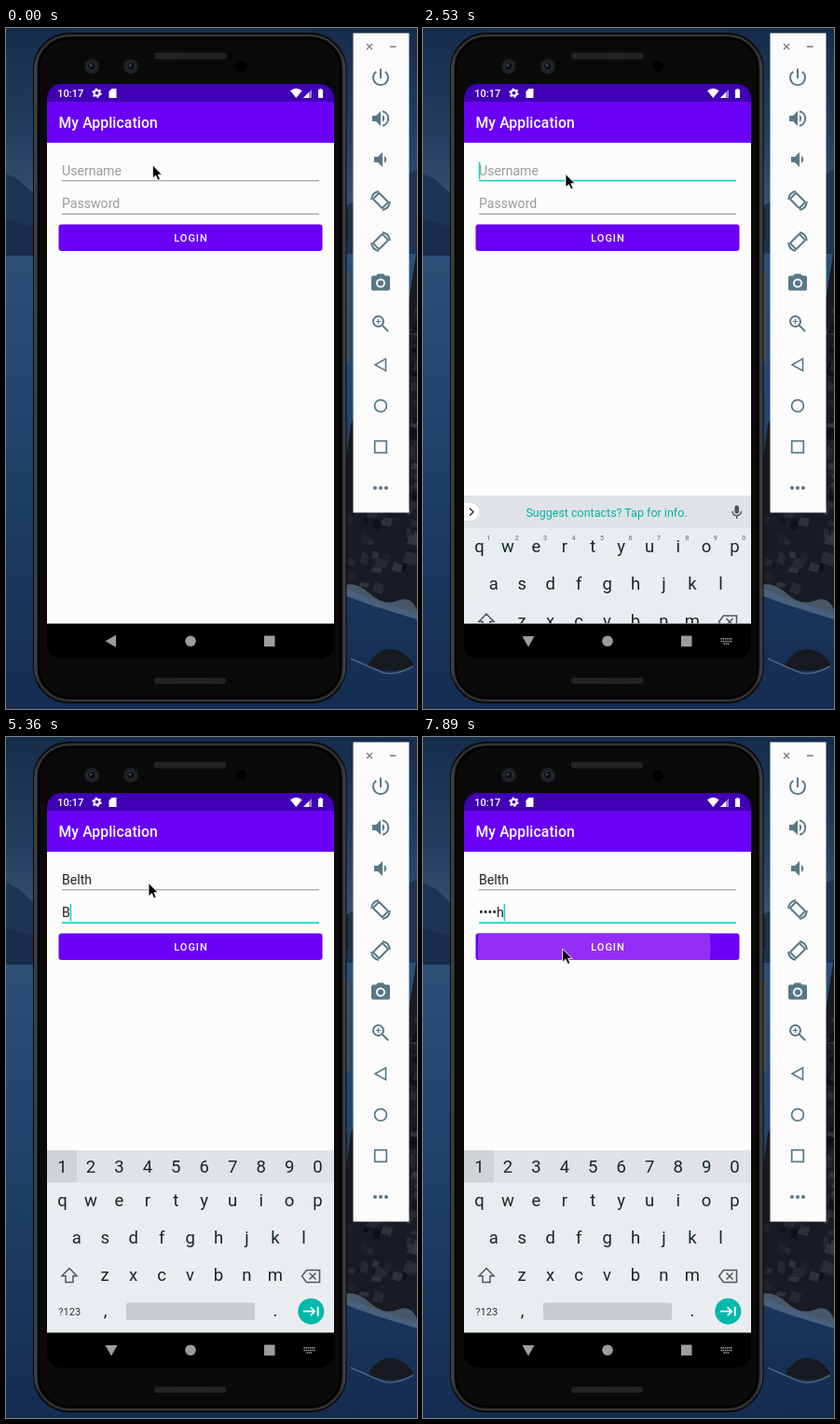
Animation of 441 by 730 pixels, one loop 8 s. Source, as an HTML page:

```html
<!DOCTYPE html>
<html lang="en">
<head>
<meta charset="utf-8">
<title>Login demo</title>
<style>
html, body { margin: 0; width: 100%; height: 100%; overflow: hidden; background: #14294a; }
svg { display: block; width: 441px; height: 730px; font-family: Roboto, sans-serif; }
.mid { text-anchor: middle; }
.line { fill: none; stroke-width: 2; }
</style>
</head>
<body>
<svg id="stage" viewBox="0 0 441 730" xmlns="http://www.w3.org/2000/svg">
  <defs>
    <linearGradient id="sky" x2="0" y2="1">
      <stop offset="0" stop-color="#162c4b"/>
      <stop offset=".5" stop-color="#243f61"/>
      <stop offset="1" stop-color="#46607f"/>
    </linearGradient>
    <linearGradient id="sea" x2="0" y2="1">
      <stop offset="0" stop-color="#2c5078"/>
      <stop offset=".3" stop-color="#234670"/>
      <stop offset="1" stop-color="#142c50"/>
    </linearGradient>
    <linearGradient id="rim">
      <stop offset="0" stop-color="#4b4b4c"/>
      <stop offset=".02" stop-color="#161616"/>
      <stop offset=".98" stop-color="#161616"/>
      <stop offset="1" stop-color="#4b4b4c"/>
    </linearGradient>
    <pattern id="mesh" width="3" height="3" patternUnits="userSpaceOnUse">
      <rect width="3" height="3" fill="#2b2b2b"/><path d="M0 0L3 3M3 0L0 3" stroke="#171717" stroke-width=".7"/>
    </pattern>
    <clipPath id="screen"><rect x="44" y="60" width="308" height="616" rx="15"/></clipPath>
    <clipPath id="app"><rect x="44" y="123" width="308" height="515"/></clipPath>
    <clipPath id="button"><rect x="56.5" y="210.5" width="283" height="28.5" rx="3"/></clipPath>
  </defs>

  <!-- wallpaper -->
  <rect width="441" height="245" fill="url(#sky)"/>
  <rect y="240" width="441" height="490" fill="url(#sea)"/>
  <path d="M0 156L14 163 32 180V240H0ZM441 152L365 190V242H441Z" fill="#1d3453"/>
  <path d="M0 205L32 214V244H0Z" fill="#182d4b"/>
  <path d="M441 236L431 300 392 380 370 425 360 500 358 598 392 612 441 628Z" fill="#181b22"/>
  <g id="rocks"></g>
  <path d="M358 598Q375 592 390 606T420 614 441 624V634Q415 626 396 620T358 606Z" fill="#637890" opacity=".65"/>
  <path d="M388 684Q398 664 416 666 432 670 438 684 414 694 388 684Z" fill="#171a20"/>
  <path d="M370 676Q388 684 402 690T437 684" fill="none" stroke="#71839a" stroke-width="1.5" opacity=".6"/>

  <!-- phone -->
  <rect x="364" y="194" width="3.5" height="34" rx="1" fill="#252525"/>
  <rect x="364" y="261" width="4" height="97" rx="1" fill="#4d4d4f"/>
  <rect x="29.5" y="5.5" width="335.5" height="718" rx="38" fill="url(#rim)" stroke="#050505"/>
  <rect x="32" y="8" width="330.5" height="713" rx="36" fill="none" stroke="#3f3f40" stroke-width="1.3"/>
  <rect x="35" y="11" width="324.5" height="707" rx="33" fill="#0a0a0a" stroke="#000" stroke-width="2"/>
  <rect x="159" y="26.5" width="77" height="7" rx="3" fill="url(#mesh)"/>
  <rect x="159" y="696.5" width="77" height="6.5" rx="3" fill="url(#mesh)"/>
  <g id="lenses"></g>
  <circle cx="252" cy="41" r="6" fill="#000"/>

  <g clip-path="url(#screen)">
    <rect x="44" y="60" width="308" height="616" fill="#000"/>
    <rect x="44" y="60" width="308" height="19.5" fill="#4000b4"/>
    <rect x="44" y="79" width="308" height="44" fill="#6a00f5"/>
    <rect x="44" y="123" width="308" height="515.5" fill="#fcfcfc"/>
    <g fill="#fff">
      <text x="55.3" y="73.7" font-size="11" font-weight="500">10:17</text>
      <g fill="none" stroke="#fff">
        <circle cx="97.5" cy="69.7" r="2.9" stroke-width="2"/>
        <circle cx="97.5" cy="69.7" r="4.5" stroke-width="1.5" stroke-dasharray="2.1 2.61"/>
      </g>
      <path d="M113.5 65H118.5V75H110.5V68Z"/>
      <path d="M305 67.3Q311.3 62.3 317.6 67.3L311.3 75Z"/>
      <path d="M319 75L328 66V75Z" opacity=".5"/><path d="M319 75L325 69V75Z"/>
      <path d="M335 66H336.5V65H338.5V66H340V75H335Z"/>
      <text x="56.5" y="107" font-size="15.7" font-weight="500" letter-spacing=".12">My Application</text>
    </g>

    <g font-size="14.1">
      <text id="user" x="60" y="158"></text>
      <text id="pass" x="60" y="193.2"></text>
    </g>
    <rect id="userLine" x="60" width="276"/>
    <rect id="passLine" x="60" width="276"/>
    <rect id="compose" x="60" y="158.8" height="1" fill="#333"/>
    <rect id="caret" width="1.6" height="18.5" fill="#1fd1c0"/>
    <g clip-path="url(#button)">
      <rect x="56" y="210" width="284" height="30" fill="#6a00f5"/>
      <path id="ripple" d="M59.5 210Q58 225 59.5 240H307.5Q309.5 225 307.5 210Z" fill="#942ef7"/>
    </g>
    <text class="mid" x="198.5" y="229" font-size="11" font-weight="500" letter-spacing=".98" fill="#fff">LOGIN</text>

    <g clip-path="url(#app)"><g id="keyboard">
      <rect x="44" y="443" width="308" height="196" fill="#e9edf0"/>
      <rect x="44" y="443" width="308" height="34.5" fill="#dfe3e6"/>
      <g id="strip">
        <path d="M44 450.5H50.5A9.5 9.5 0 0 1 50.5 469.5H44Z" fill="#fff"/>
        <path d="M50 456.3L54 460.3 50 464.3" fill="none" stroke="#333" stroke-width="1.5"/>
        <text id="notice" class="mid" x="197" y="465" font-size="12.5" fill="#00b3a1">Suggest contacts? Tap for info.</text>
        <g id="words" font-size="14.2" fill="#56646c"></g>
        <g fill="#4b565c">
          <rect x="334.4" y="453.2" width="4.6" height="9" rx="2.3"/>
          <path d="M332 459.5Q332 464.2 336.7 464.2T341.4 459.5M336.7 464V467.5" fill="none" stroke="#4b565c" stroke-width="1.4"/>
        </g>
      </g>
      <g id="digits" font-size="18.5" fill="#16262d">
        <rect id="pressed" x="44" y="443" width="32" height="34.5" fill="#d0d4d6"/>
      </g>
      <g id="hints" font-size="7.2" fill="#59666d"></g>
      <g id="letters" font-size="18.5" fill="#16262d"></g>
      <g fill="none" stroke="#4b585f" stroke-width="1.5">
        <path d="M68 569.5L76 577.8H72V584.5H64V577.8H60Z"/>
        <path d="M322.5 571.5H336.5V584.5H322.5L317.5 578Z"/>
        <path d="M325.5 574.5L332.5 581.5M332.5 574.5L325.5 581.5"/>
      </g>
      <text class="mid" x="68.2" y="620" font-size="11" fill="#2a383f">?123</text>
      <rect id="space" y="606.5" height="18.5" rx="2" fill="#c8ccd0"/>
      <g id="smile" fill="none" stroke="#4b585f" stroke-width="1.4">
        <circle cx="136.8" cy="615.7" r="7.3"/>
        <path d="M132.8 617.5Q136.8 622.8 140.8 617.5Z" fill="#4b585f" stroke="none"/>
        <path d="M133.2 613.3H135.4M138.2 613.3H140.4" stroke-width="2"/>
      </g>
      <circle cx="327.3" cy="615.7" r="14" fill="#02b8aa"/>
      <path d="M319 615.7H331M326.7 611.2L331.2 615.7 326.7 620.2M334.7 610.7V620.7" fill="none" stroke="#fff" stroke-width="1.8"/>
    </g></g>

    <g fill="#9d9d9d">
      <path id="back"/>
      <circle cx="198" cy="657.2" r="5.8"/>
      <rect x="277" y="651.5" width="11.5" height="11.5" rx=".5"/>
      <path id="kbIcon" d="M319.5 654.7H331.5M319.5 657.4H331.5M322.5 660.1H328.5" stroke="#9d9d9d" stroke-width="1.5" stroke-dasharray="1.5 .6"/>
    </g>
  </g>

  <!-- emulator toolbar -->
  <rect x="372.5" y="5.5" width="60" height="514" fill="#fbfbfb"/>
  <path d="M387 17L393 23M393 17L387 23M412 20H418.5" stroke="#75797c" stroke-width="1.3"/>
  <g id="tools" fill="#587887" stroke="#587887"></g>

  <path id="pointer" d="M0 0V14.4L3.4 11.3 5.7 16.5 8.2 15.4 5.9 10.4H10.2Z" fill="#000" stroke="#fff" stroke-width=".9"/>
</svg>
<script>
const NS = 'http://www.w3.org/2000/svg';
const $ = id => document.getElementById(id);
function add(parent, tag, attrs, text) {
  const el = document.createElementNS(NS, tag);
  for (const k in attrs) el.setAttribute(k, attrs[k]);
  if (text) el.textContent = text;
  $(parent).appendChild(el);
  return el;
}
const set = (id, attrs) => { for (const k in attrs) $(id).setAttribute(k, attrs[k]); };
const show = (id, on) => $(id).style.display = on ? '' : 'none';

// rock facets
let seed = 7;
const rnd = () => (seed = seed * 16807 % 2147483647) / 2147483647;
for (let i = 0; i < 60; i++) {
  const y = 300 + rnd() * 295;
  const x = y < 510 ? 434 + rnd() * 6 : 364 + rnd() * 76;
  const w = 4 + rnd() * 9, h = 3 + rnd() * 9;
  add('rocks', 'path', {
    d: `M${x} ${y}l${w} ${h * .4}l${-w * .3} ${h}l${-w} ${-h * .3}z`,
    fill: ['#2a2d34', '#0d1016', '#353840', '#20242c'][i % 4], opacity: .8
  });
}

for (const x of [92, 134]) {
  add('lenses', 'circle', { cx: x, cy: 41, r: 8, fill: '#1d1f22' });
  add('lenses', 'circle', { cx: x, cy: 41, r: 4.5, fill: '#0c1017', stroke: '#30363e' });
  add('lenses', 'circle', { cx: x - 1, cy: 40, r: 1.5, fill: '#3c4653' });
}

// toolbar icons, each centred on its own origin
const ring = 'class="line" d=';
const turn = `<rect class="line" x="-4.6" y="-7" width="9.2" height="14" rx="1" transform="rotate(-45)"/>
  <path ${ring}"M-9.8 -1Q-9.5 -8.5 -2 -10M9.8 1Q9.5 8.5 2 10" stroke-width="1.6"/>`;
const speaker = '<path d="M-9 -3H-5L0 -8V8L-5 3H-9Z" stroke="none"/><path d="M2 -4Q6.5 0 2 4Z" stroke="none"/>';
const icons = [
  `<path ${ring}"M-4.8 -6.2A8 8 0 1 0 4.8 -6.2M0 -9.5V1"/>`,
  speaker + `<path ${ring}"M2 -7.8A8 8 0 0 1 2 7.8"/>`,
  `<g transform="translate(2)">${speaker}</g>`,
  turn,
  `<g transform="scale(-1 1)">${turn}</g>`,
  `<path fill-rule="evenodd" stroke="none" d="M-3 -9.5H3L4.8 -7.5H8Q10 -7.5 10 -5.5V6.5Q10 8.5 8 8.5H-8Q-10 8.5 -10 6.5V-5.5Q-10 -7.5 -8 -7.5H-4.8ZM0 -4.5A5 5 0 1 0 .01 -4.5Z"/><circle cy=".5" r="3.1" stroke="none"/>`,
  `<circle class="line" cx="-2.5" cy="-2.5" r="5.5"/><path ${ring}"M1.7 1.7L8.2 8.2"/><path ${ring}"M-5.2 -2.5H.2M-2.5 -5.2V.2" style="stroke-width:1.2"/>`,
  `<path ${ring}"M5.5 -6.5V6.5L-6 0Z" style="stroke-width:1.6"/>`,
  '<circle class="line" r="6.4" style="stroke-width:1.7"/>',
  '<rect class="line" x="-6.3" y="-6.3" width="12.6" height="12.6" style="stroke-width:1.7"/>',
  [-6, 0, 6].map(x => `<circle cx="${x}" r="2" stroke="none"/>`).join('')
];
icons.forEach((svg, i) => {
  add('tools', 'g', { transform: `translate(402 ${53 + i * 44})` }).innerHTML = svg;
});

// keys
const STEP = 30.45;
function keyRow(parent, chars, x, y) {
  [...chars].forEach((c, i) => add(parent, 'text', { class: 'mid', x: x + i * STEP, y }, c));
}
keyRow('letters', 'qwertyuiop', 60.5, 503.3);
keyRow('letters', 'asdfghjkl', 75.8, 543);
keyRow('letters', 'zxcvbnm', 106.2, 583);
add('letters', 'text', { class: 'mid', x: 106.5, y: 621 }, ',');
add('letters', 'text', { class: 'mid', x: 289, y: 621 }, '.');
keyRow('hints', '1234567890', 70.2, 490.5);
keyRow('digits', '1234567890', 60.5, 467.3);

const words = [112.5, 197, 281.3].map(x => add('words', 'text', { class: 'mid', x, y: 465.6 }));
for (const x of [153, 241.5]) add('words', 'rect', { x, y: 451, width: 1, height: 19, fill: '#c9cdd0' });

// each step overrides the state from its time on
const steps = [
  [0, { x: 157.3, y: 146.8, focus: '', caret: 0, user: '', pass: '', nav: 0, kb: 0, mode: 'notice', press: 0, ripple: 0 }],
  [1050, { x: 156, y: 150 }],
  [1200, { x: 153.6, y: 155 }],
  [1330, { x: 153, y: 156.4 }],
  [1480, { focus: 'user' }],
  [1630, { caret: 1 }],
  [1930, { nav: 1 }],
  [2080, { caret: 0 }],
  [2530, { caret: 1, kb: .7 }],
  [2680, { kb: 1 }],
  [2830, { user: 'B', mode: 'B But By' }],
  [2970, { user: 'Be', mode: 'Be Been Being' }],
  [3570, { caret: 0 }],
  [3720, { user: 'Bel', caret: 1, mode: 'Bel Belt Bell' }],
  [3870, { user: 'Belt', mode: 'Belt Belts Belted' }],
  [4020, { user: 'Belth', mode: 'Belth Belthful Belthfully' }],
  [4460, { caret: 0 }],
  [4610, { focus: 'pass' }],
  [4760, { caret: 1, mode: 'digits' }],
  [4910, { press: 1 }],
  [5210, { caret: 0 }],
  [5360, { pass: 'B', caret: 1 }],
  [5810, { pass: '•e' }],
  [6260, { caret: 0 }],
  [6560, { pass: '••l', caret: 1 }],
  [6710, { pass: '•••t' }],
  [6850, { pass: '••••h' }],
  [7150, { x: 151.5, y: 166 }],
  [7300, { x: 148.7, y: 194, caret: 0 }],
  [7450, { x: 149, y: 215 }],
  [7600, { x: 149.7, y: 227 }],
  [7890, { caret: 1, ripple: 1 }]
];
const stateAt = t => Object.assign({}, ...steps.filter(s => s[0] <= t).map(s => s[1]));

function field(id, value, hint, focused, y) {
  $(id).textContent = value || hint;
  set(id, { fill: value ? '#222' : '#9b9b9b' });
  set(id + 'Line', focused ? { y: y - .5, height: 1.7, fill: '#1fd1c0' } : { y, height: 1, fill: '#8b8b8b' });
}

function draw(t) {
  const s = stateAt(t), onUser = s.focus === 'user';
  field('user', s.user, 'Username', onUser, 163.3);
  field('pass', s.pass, 'Password', s.focus === 'pass', 198.8);

  const id = onUser ? 'user' : 'pass';
  const width = s[id] ? $(id).getComputedTextLength() : 0;
  set('caret', { x: 59.8 + width, y: onUser ? 143.5 : 178.8 });
  show('caret', s.caret);
  show('compose', onUser && s.user);
  set('compose', { width: onUser ? width : 0 });

  const digits = s.mode === 'digits', notice = s.mode === 'notice';
  show('keyboard', s.kb);
  set('keyboard', { transform: `translate(0 ${(1 - s.kb) * 195})` });
  show('strip', !digits);
  show('hints', !digits);
  show('smile', !digits);
  show('digits', digits);
  show('pressed', s.press);
  show('notice', notice);
  show('words', !notice);
  s.mode.split(' ').forEach((w, i) => words[i].textContent = w);
  const left = digits ? 129 : 159;
  set('space', { x: left, width: 267 - left });

  set('back', { d: s.nav ? 'M106.5 652H119.5L113 663.5Z' : 'M118 650.7V663.7L106.5 657.2Z' });
  show('kbIcon', s.nav);
  show('ripple', s.ripple);
  set('pointer', { transform: `translate(${s.x} ${s.y})` });
}

function tick() {
  draw(performance.now() % 8000);
  requestAnimationFrame(tick);
}
tick();
</script>
</body>
</html>
```
